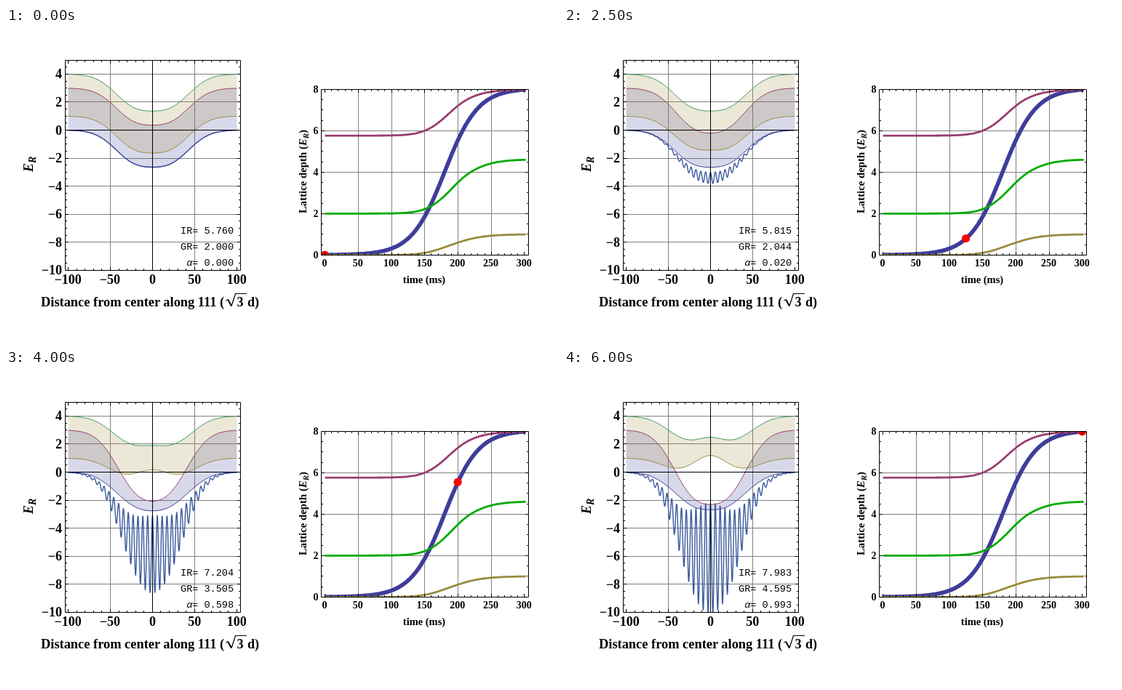
An HTML page for the animation above (6500 ms loop, 759 px wide and 432 px high).

```html
<!DOCTYPE html>
<html lang="en">
<head>
<meta charset="utf-8">
<title>Lattice ramp</title>
<style>
html, body { margin: 0; width: 100%; height: 100%; overflow: hidden; background: #fff; }
svg { display: block; width: 759px; height: 432px; }
text { font-family: "Liberation Serif", Times, serif; font-weight: bold; }
.mono { font-family: "Liberation Mono", monospace; font-weight: normal; font-size: 13.5px; white-space: pre; }
</style>
</head>
<body>
<svg id="stage" viewBox="0 0 759 432" xmlns="http://www.w3.org/2000/svg">
  <defs>
    <clipPath id="clipL"><rect x="81" y="44" width="242" height="290"/></clipPath>
    <clipPath id="clipR"><rect x="433" y="84" width="286" height="229"/></clipPath>
  </defs>
  <rect width="759" height="432" fill="#fff"/>
</svg>
<script>
const NS = "http://www.w3.org/2000/svg";
const stage = document.getElementById("stage");
const BLUE = "#3f3d99", PLUM = "#993d70", OLIVE = "#998c3d", GREEN = "#3d9956";

function add(tag, attrs, text, parent = stage) {
  const el = document.createElementNS(NS, tag);
  for (const k in attrs) el.setAttribute(k, attrs[k]);
  if (text !== undefined) el.textContent = text;
  parent.appendChild(el);
  return el;
}
const label = (x, y, size, anchor, text) =>
  add("text", { x, y, "font-size": size, "text-anchor": anchor }, text);
const stroke = (d, color, width = 1, parent = stage) =>
  add("path", { d, fill: "none", stroke: color, "stroke-width": width, "stroke-linejoin": "round" }, undefined, parent);
const snap = v => Math.floor(v) + 0.5;
const toPath = pts => "M" + pts.map(p => p[0].toFixed(2) + "," + p[1].toFixed(2)).join("L");
const minus = v => String(v).replace("-", "\u2212");

// plot coordinates
const lx = v => 201.4 + 1.158 * v, ly = v => 140.5 - 19.27 * v;
const rx = v => 438.65 + 0.914 * v, ry = v => 312.3 - 28.5 * v;

// ramp parameters, sampled every 50 ms of lattice time
const IR = [5.7601, 5.761, 5.772, 6.003, 7.204, 7.878, 7.983];
const GR = [2.00002, 2.0003, 2.008, 2.216, 3.505, 4.42, 4.595];
const ALPHA = [1e-6, 6e-5, 0.003, 0.102, 0.598, 0.93, 0.993];
const DEPTH = IR.map((v, i) => v * Math.sqrt(ALPHA[i]));

// squared beam radius (in plot units) and squared ratio of the two beam waists
const RADIUS2 = 1521, RATIO2 = 1.36;

// smooth growth from base to base + span, interpolated on a logistic scale
function ramp(knots, base, span) {
  const z = knots.map(v => Math.log((v - base) / (base + span - v)));
  const n = z.length - 1;
  const at = i => i < 0 ? 2 * z[0] - z[1] : i > n ? 2 * z[n] - z[n - 1] : z[i];
  return t => {
    const u = t / 50, i = Math.min(n - 1, Math.floor(u)), f = u - i;
    const a = at(i - 1), b = at(i), c = at(i + 1), d = at(i + 2);
    const v = b + f / 2 * (c - a + f * (2 * a - 5 * b + 4 * c - d + f * (3 * (b - c) + d - a)));
    return base + span / (1 + Math.exp(-v));
  };
}
const infrared = ramp(IR, 5.76, 2.24);
const green = ramp(GR, 2, 2.615);
const depth = ramp(DEPTH, 0, 8.02);
const alpha = t => (depth(t) / infrared(t)) ** 2;
const plotted = t => 8.05 / (1 + Math.exp((180.1 - t) / 25));

// lowest eigenvalue of a symmetric tridiagonal matrix, by bisection
function lowest(diag, off2) {
  let lo = -1, hi = diag[0] + 1e-9;
  for (let k = 0; k < 28; k++) {
    const mid = (lo + hi) / 2;
    let p = diag[0] - mid, below = p > 0;
    for (let i = 1; below && i < diag.length; i++) {
      p = diag[i] - mid - off2[i - 1] / p;
      below = p > 0;
    }
    if (below) lo = mid; else hi = mid;
  }
  return (lo + hi) / 2;
}

// edges of the two lowest bands for depth s
function bands(s) {
  const h = s / 2, c = s / 4, q = c * c;
  const min0 = lowest([h, 4 + h, 16 + h, 36 + h, 64 + h], [2 * q, q, q, q]);
  const max0 = lowest([1 + h - c, 9 + h, 25 + h, 49 + h], [q, q, q]);
  const min1 = lowest([1 + h + c, 9 + h, 25 + h, 49 + h], [q, q, q]);
  const max1 = lowest([4 + h, 16 + h, 36 + h, 64 + h], [q, q, q]);
  return [3 * min0, 3 * max0, min1 + 2 * min0, max1 + 2 * min0];
}

function grid(xs, ys, px, py, box) {
  let d = "";
  for (const x of xs) d += `M${snap(px(x))},${box[1]}V${box[3]}`;
  for (const y of ys) d += `M${box[0]},${snap(py(y))}H${box[2]}`;
  stroke(d, "#808080");
}

function frame(box, px, py, xr, yr, xMajor, yMajor) {
  const [x0, y0, x1, y1] = box;
  let d = `M${x0},${y0}H${x1}V${y1}H${x0}Z`;
  for (let v = xr[0]; v <= xr[1]; v += 10) {
    const x = snap(px(v)), n = v % xMajor ? 2.5 : 4.5;
    d += `M${x},${y0}v${n}M${x},${y1}v${-n}`;
  }
  for (let v = yr[0]; v <= yr[1]; v += 0.5) {
    const y = snap(py(v)), n = v % yMajor ? 2.5 : 4.5;
    d += `M${x0},${y}h${n}M${x1},${y}h${-n}`;
  }
  stroke(d, "#000");
}

// left plot
const boxL = [81.5, 44.5, 322.5, 333.5];
grid([-50, 50], [4, 2, -2, -4, -6, -8], lx, ly, boxL);
const left = add("g", { "clip-path": "url(#clipL)" });
const fills = [BLUE, OLIVE].map(c => add("path", { fill: c, "fill-opacity": 0.2 }, undefined, left));
const wave = stroke("", "#3a5a9c", 1.4, left);
const edges = [BLUE, PLUM, OLIVE, GREEN].map(c => stroke("", c, 1, left));
stroke("M201.5,44V333M81,140.5H322", "#000");
frame(boxL, lx, ly, [-100, 100], [-9.5, 4.5], 50, 2);
for (let v = -100; v <= 100; v += 50) label(lx(v) - (v < 0 ? 0.5 : 0), 352, 18, "middle", minus(v));
for (let v = -10; v <= 4; v += 2) label(77, ly(v) + 6, 18, "end", minus(v));
label(48, 383, 18.4, "start", "Distance from center along 111 (");
stroke("M302,375.5L305,373.5", "#000", 1);
stroke("M305,373.5L310,382.5", "#000", 2);
stroke("M310,382.5L315.5,365.5H331", "#000", 1.2);
label(317.5, 383, 18, "start", "3");
label(332, 383, 18, "start", "d)");

function turned(x, y, size, parts) {
  const t = add("text", { transform: `translate(${x} ${y}) rotate(-90)`, "font-size": size });
  for (const [text, attrs] of parts) add("tspan", attrs, text, t);
}
const sub = (size, dy) => ({ "font-style": "italic", "font-size": size, dy });
turned(37, 198, 18, [["E", { "font-style": "italic" }], ["R", sub(14, 4)]]);

const readouts = [283, 305, 327].map(y =>
  add("text", { x: 313, y, "text-anchor": "end", class: "mono" }));
const alphaSign = add("tspan", { "font-style": "italic" }, "\u03b1", readouts[2]);
const alphaText = add("tspan", {}, "", readouts[2]);

// right plot
const boxR = [433.5, 84.5, 718.5, 312.5];
grid([50, 100, 150, 200, 250], [2, 4, 6], rx, ry, boxR);
const right = add("g", { "clip-path": "url(#clipR)" });
function curve(fn, color, width) {
  const pts = [];
  for (let t = 0; t <= 302; t += 2) pts.push([rx(t), ry(fn(t))]);
  stroke(toPath(pts), color, width, right);
}
curve(plotted, BLUE, 5.6);
curve(infrared, PLUM, 2.8);
curve(alpha, OLIVE, 2.8);
curve(green, "#00aa00", 2.8);
const dot = add("circle", { r: 5.6, fill: "#f00" }, undefined, right);
frame(boxR, rx, ry, [0, 300], [0.5, 7.5], 50, 2);
for (let v = 0; v <= 300; v += 50) label(rx(v) - 0.6, 328, 14, "middle", v);
for (let v = 0; v <= 8; v += 2) label(429.5, ry(v) + 4.5, 14, "end", v);
label(575, 351, 14.5, "middle", "time (ms)");
turned(413, 255, 14.8, [["Lattice depth (", {}], ["E", { "font-style": "italic" }],
  ["R", sub(11, 3)], [")", { dy: -3 }]]);

function draw(t) {
  const ir = infrared(t), gr = green(t), s = depth(t);
  const gauss = x => Math.exp(-x * x / RADIUS2);
  const well = g => -1.5 * (ir + s) * g + 3 * gr * g ** RATIO2;

  const lines = [[], [], [], []];
  for (let x = -100; x <= 100; x += 2) {
    const g = gauss(x), base = well(g);
    bands(s * g).forEach((e, i) => lines[i].push([lx(x), ly(base + e)]));
  }
  lines.forEach((pts, i) => edges[i].setAttribute("d", toPath(pts)));
  fills.forEach((f, i) =>
    f.setAttribute("d", toPath(lines[2 * i].concat(lines[2 * i + 1].slice().reverse())) + "Z"));

  const pts = [];
  for (let i = 0; i <= 600; i++) {
    const x = i / 3 - 100, g = gauss(x);
    pts.push([lx(x), ly(well(g) + s * g * Math.cos(Math.PI * x / 5.74) ** 2)]);
  }
  wave.setAttribute("d", toPath(pts));

  readouts[0].textContent = "IR= " + ir.toFixed(3);
  readouts[1].textContent = "GR= " + gr.toFixed(3);
  alphaText.textContent = "= " + alpha(t).toFixed(3);
  dot.setAttribute("cx", rx(t) - 0.3);
  dot.setAttribute("cy", ry(plotted(t)));
}

let shown = -1;
function tick() {
  const step = Math.floor(performance.now() % 6500 / 500);
  if (step !== shown) draw((shown = step) * 25);
  requestAnimationFrame(tick);
}
tick();
</script>
</body>
</html>
```
